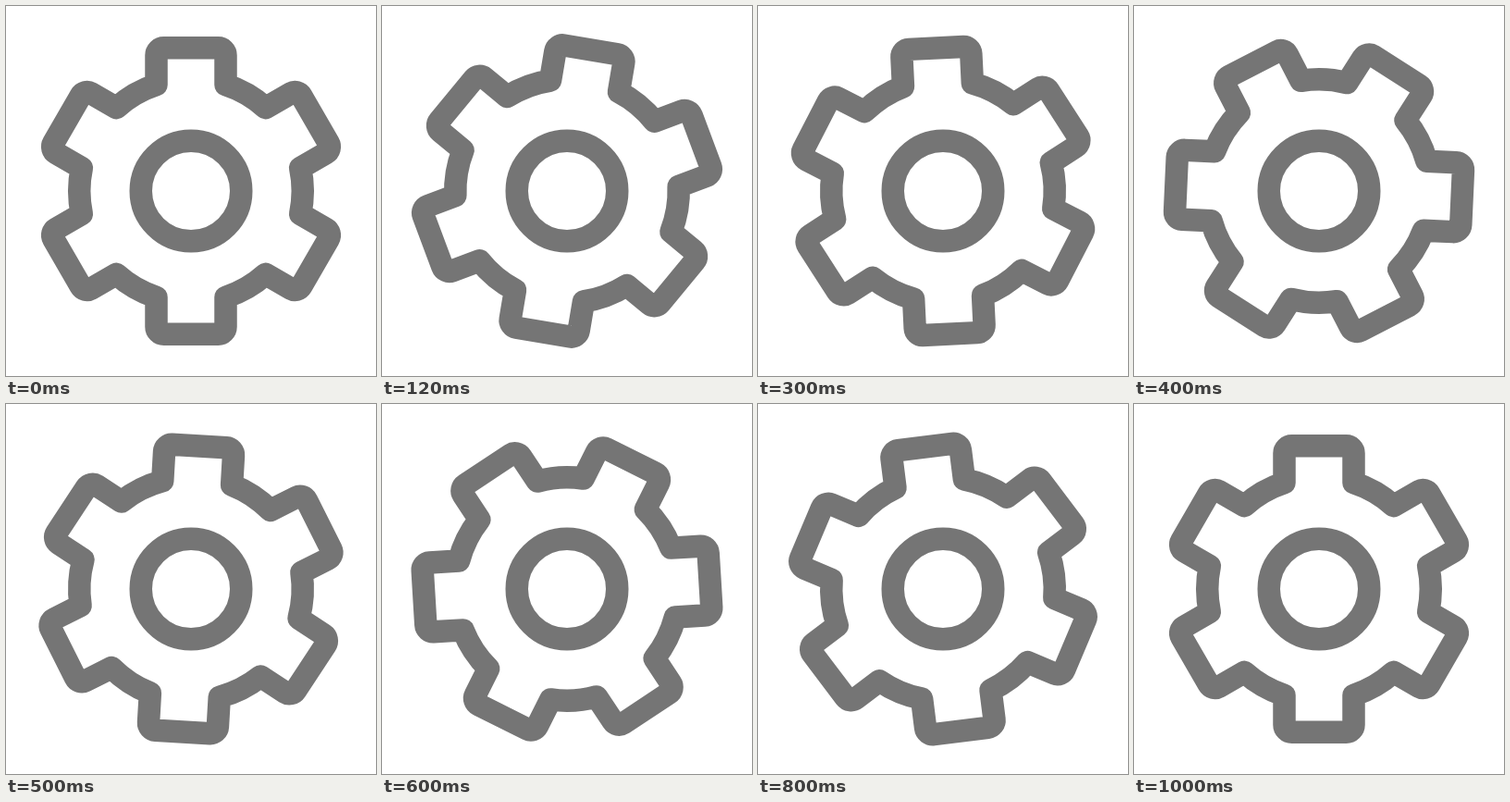
An HTML page that plays this animation: 400x400 px, repeating every 1.02 s.

```html
<!DOCTYPE html>
<html lang="en">
<head>
<meta charset="utf-8">
<title>Turning gear</title>
<style>
  html, body { margin: 0; width: 100%; height: 100%; overflow: hidden; background: #fff; }
  svg { display: block; width: 100%; height: 100%; }
</style>
</head>
<body>
<svg viewBox="-200 -200 400 400">
  <g fill="none" stroke="#757575" stroke-width="24.5" stroke-linejoin="round">
    <path id="gear"/>
    <circle r="54.25"/>
  </g>
</svg>
<script>
const LOOP = 1020, STEP = 25, TURN_TIME = 1000, TURN = 180;
const TEETH = 6, BODY = 120.75, TIP = 154.75, HALF = 37.5, CORNER = 8;
const gear = document.getElementById('gear');

function gearPath() {
  const root = -Math.sqrt(BODY ** 2 - HALF ** 2);
  let d = '';
  for (let i = 0; i < TEETH; i++) {
    const a = i * 2 * Math.PI / TEETH, cos = Math.cos(a), sin = Math.sin(a);
    const at = (x, y) => `${(x * cos - y * sin).toFixed(2)} ${(x * sin + y * cos).toFixed(2)}`;
    const round = `A${CORNER} ${CORNER} 0 0 1 `;
    d += (i ? `A${BODY} ${BODY} 0 0 1 ` : 'M') + at(-HALF, root)
      + 'L' + at(-HALF, CORNER - TIP) + round + at(CORNER - HALF, -TIP)
      + 'L' + at(HALF - CORNER, -TIP) + round + at(HALF, CORNER - TIP)
      + 'L' + at(HALF, root);
  }
  return d + `A${BODY} ${BODY} 0 0 1 ${-HALF} ${root.toFixed(2)}Z`;
}

// Cubic Bezier easing with control points (x1, 0) and (x2, 1).
function ease(x, x1 = 0.333, x2 = 0.38) {
  let lo = 0, hi = 1;
  for (let i = 0; i < 30; i++) {
    const s = (lo + hi) / 2, r = 1 - s;
    if (3 * r * r * s * x1 + 3 * r * s * s * x2 + s ** 3 < x) lo = s; else hi = s;
  }
  return x >= 1 ? 1 : x <= 0 ? 0 : lo * lo * (3 - 2 * lo);
}

function draw(time) {
  // Poses are 25 ms apart, shown on a 10 ms clock.
  const tick = Math.floor((time % LOOP) / 10) * 10;
  const pose = Math.floor((tick + 5) / STEP) * STEP;
  gear.setAttribute('transform', `rotate(${(TURN * ease(pose / TURN_TIME)).toFixed(3)})`);
}

gear.setAttribute('d', gearPath());
const start = performance.now();
function frame() {
  draw(performance.now() - start);
  requestAnimationFrame(frame);
}
frame();
</script>
</body>
</html>
```
